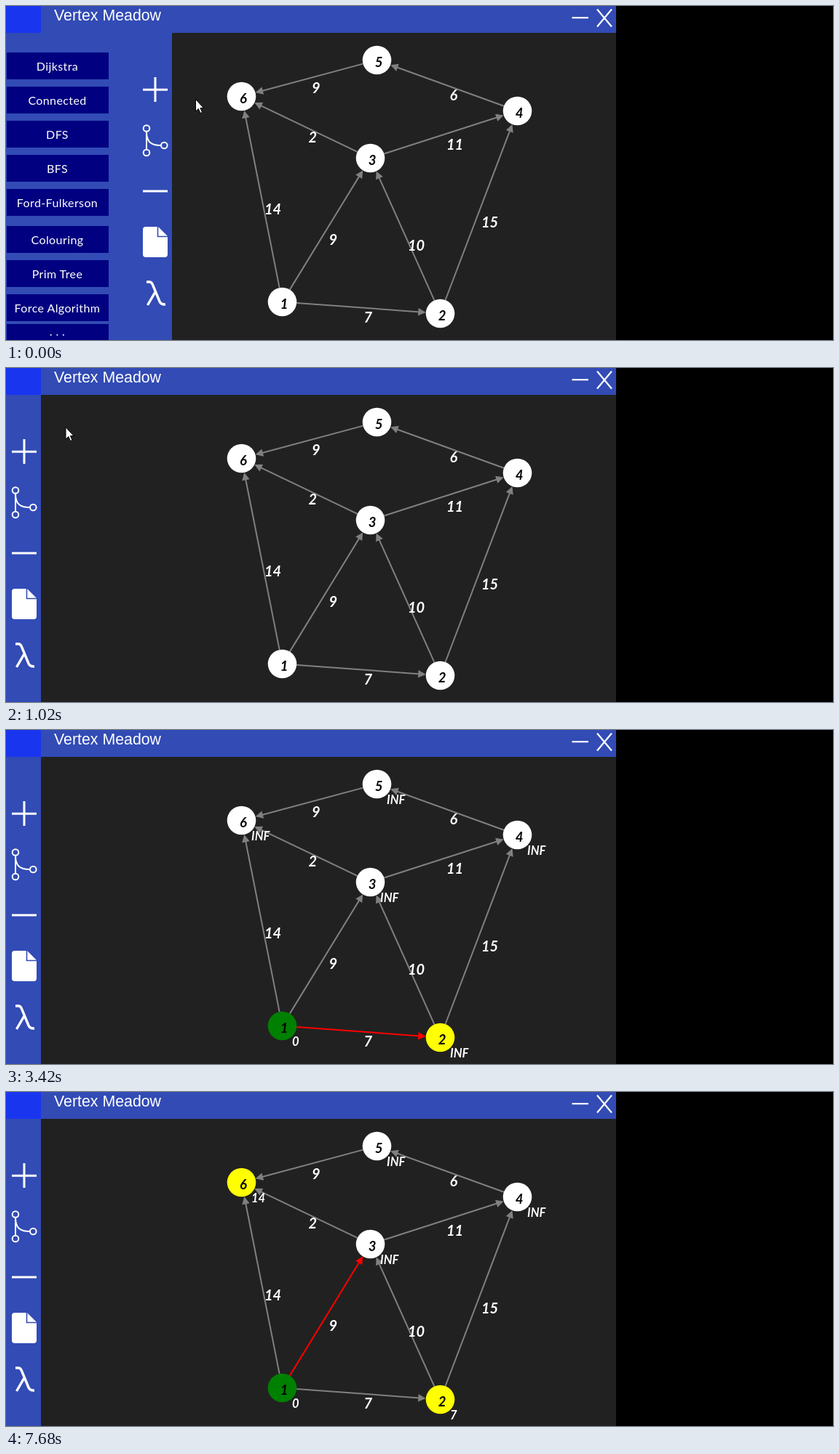
Recreate the animation shown at these times as an HTML page. Size 1136 px wide and 460 px high, loop 8 s.

```html
<!DOCTYPE html>
<html lang="en">
<head>
<meta charset="utf-8">
<title>Vertex Meadow</title>
<style>
html, body { margin: 0; width: 100%; height: 100%; overflow: hidden; background: #000; }
svg { display: block; width: 1136px; height: 460px; }
.stroke { fill: none; stroke: #fff; }
.title { font: 21.33px "Liberation Sans", Arial, sans-serif; fill: #fff; }
.menu { font: 16px Lato, sans-serif; letter-spacing: .4px; fill: #fff; text-anchor: middle; }
.num { font: italic 700 20px Lato, sans-serif; fill: #fff; }
.id { font-size: 18.5px; fill: #000; text-anchor: middle; }
.dist { font-size: 16.5px; }
.head { font: 700 15.6px "Liberation Sans", Arial, sans-serif; fill: #fff; }
.field { font: 18px "Open Sans", sans-serif; fill: #111; text-anchor: middle; }
</style>
</head>
<body>
<svg id="stage" viewBox="0 0 1136 460">
  <rect width="838" height="460" fill="#212121"/>
  <g id="graph"></g>

  <g id="panel">
    <rect y="37" width="228" height="423" fill="#324bb5"/>
    <g id="buttons"></g>
  </g>
  <g id="tools">
    <rect x="180" y="37" width="48" height="423" fill="#324bb5"/>
    <path class="stroke" stroke-width="3" d="M188 115.2H222M205 98V132M188 255H222"/>
    <g class="stroke" stroke-width="2">
      <circle cx="193" cy="168.5" r="4.3"/>
      <circle cx="193" cy="202" r="4.3"/>
      <circle cx="217.3" cy="192" r="4.3"/>
      <path d="M193 173V197.500M193 173C193 187 199 192 213 192"/>
    </g>
    <path fill="#fff" d="M192 304H209L222 317V342Q222 346 218 346H192Q188 346 188 342V308Q188 304 192 304Z"/>
    <path fill="none" stroke="#324bb5" stroke-width="1.6" d="M208.500 304V317.500H222"/>
    <path class="stroke" stroke-width="3.4" d="M193 380H197Q200 380 201.500 384L211 407Q213 411.500 219 411M205.500 393L194.500 412"/>
  </g>

  <rect width="838" height="37" fill="#324bb5"/>
  <rect width="48" height="37" fill="#1a35ee"/>
  <text class="title" x="66" y="20">Vertex Meadow</text>
  <path class="stroke" stroke-width="2.2" d="M777.500 16.200H800M812 4.500L832 28.500M832 4.500L812 28.500"/>

  <g id="dialog">
    <rect x="391" y="228" width="334" height="130" fill="#eee"/>
    <rect x="391" y="228" width="334" height="30" fill="#324bb5"/>
    <text class="head" x="394" y="243">Start vertex</text>
    <rect x="482.500" y="279.500" width="143" height="46" fill="#eee" stroke="#555"/>
    <path fill="#324bb5" d="M427 279h56v47h-56zM625 279h56v47h-56z"/>
    <path class="stroke" stroke-width="3" d="M436 302.500H474M635 302.500H673M654 286V319"/>
    <text class="field" x="553.500" y="297">1</text>
    <rect id="caret" x="558" y="281" width="1" height="20" fill="#000"/>
  </g>

  <circle id="halo" cx="81" cy="81" r="12" fill="#dede50" fill-opacity=".55"/>
  <path id="cursor" fill="#fff" stroke="#000" d="M.5 .5V17L4.300 13.400L7 19.500L9.500 18.400L6.900 12.500H11.500Z"/>
</svg>
<script>
const LOOP = 8000, TICK = 70;
const $ = id => document.getElementById(id);

function add(parent, tag, attrs, text) {
  const el = document.createElementNS("http://www.w3.org/2000/svg", tag);
  for (const key in attrs) el.setAttribute(key, attrs[key]);
  if (text !== undefined) el.textContent = text;
  parent.appendChild(el);
  return el;
}
const show = (el, on) => el.setAttribute("visibility", on ? "visible" : "hidden");
const place = (el, x, y) => el.setAttribute("transform", `translate(${x} ${y})`);

// Vertex centres, then edges as [from, to, weight]
const R = 19.8;
const points = {
  1: [379.5, 407.5], 2: [596.5, 423.5], 3: [500.5, 209.5],
  4: [702.5, 144.5], 5: [509.5, 74.5], 6: [323.5, 124.5]
};
const links = [
  [5, 6, 9], [4, 5, 6], [3, 6, 2], [3, 4, 11], [1, 6, 14],
  [1, 3, 9], [2, 3, 10], [2, 4, 15], [1, 2, 7]
];

const edges = {}, nodes = {}, dists = {};
const graph = $("graph");

for (const [from, to] of links) {
  const [x1, y1] = points[from], [x2, y2] = points[to];
  const len = Math.hypot(x2 - x1, y2 - y1);
  const angle = Math.atan2(y2 - y1, x2 - x1) * 180 / Math.PI;
  const g = add(graph, "g", { transform: `translate(${x1} ${y1}) rotate(${angle})` });
  add(g, "path", { d: `M${R} 0H${len - 28}`, "stroke-width": 2 });
  add(g, "path", { d: `M${len - R} 0l-10.500 -5.300v10.600z`, stroke: "none" });
  edges[`${from}-${to}`] = g;
}
for (const id in points) {
  const [x, y] = points[id];
  nodes[id] = add(graph, "circle", { cx: x, cy: y, r: R });
  add(graph, "text", { class: "num id", x: x + 2.5, y: y + 9.5 }, id);
}
for (const [from, to, weight] of links) {
  const [x1, y1] = points[from], [x2, y2] = points[to];
  add(graph, "text", { class: "num", x: (x1 + x2) / 2 + 3.5, y: (y1 + y2) / 2 + 20.5 }, weight);
}
for (const id in points) {
  const [x, y] = points[id];
  dists[id] = add(graph, "text", { class: "num dist", x: x + 13.5, y: y + 27.3 });
}

const names = ["Dijkstra", "Connected", "DFS", "BFS", "Ford-Fulkerson",
  "Colouring", "Prim Tree", "Force Algorithm", ". . ."];
const buttons = names.map((name, i) => {
  const y = i === 8 ? 438 : 64 + 47 * i + (i > 4 ? 4 : 0);
  const box = add($("buttons"), "rect", {
    x: 2, y: y + 1, width: 138, height: 35, stroke: "#000080", "stroke-width": 2
  });
  add($("buttons"), "text", { class: "menu", x: 70.5, y: y + (i === 8 ? 16 : 24.5) }, name);
  return box;
});

// Algorithm steps: [time, kind, key, value]
const steps = [
  [2150, "node", 1, "#008000"], [2150, "dist", 1, "0"],
  [3090, "edge", "1-2"], [3420, "node", 2, "#ffff00"],
  [4420, "dist", 2, "0+7"], [5410, "dist", 2, "7"],
  [5410, "edge", "1-6"], [5680, "node", 6, "#ffff00"],
  [6690, "dist", 6, "0+14"], [7680, "dist", 6, "14"],
  [7680, "edge", "1-3"]
];

function cursorAt(t) {
  if (t >= 2760) return [41, 102];
  const k = t < 390 ? 0 : Math.min(1, (Math.floor((t - 390) / TICK) + 1) / 8);
  const e = k * k * (3 - 2 * k);
  return [260 - 178.5 * e, 128 - 47 * e];
}

function draw(t) {
  const state = { node: {}, dist: {}, edge: null };
  for (const [time, kind, key, value] of steps) {
    if (t < time) break;
    if (kind === "edge") state.edge = key;
    else state[kind][key] = value;
  }
  for (const id in points) {
    nodes[id].setAttribute("fill", state.node[id] || "#fff");
    dists[id].textContent = t < 2150 ? "" : state.dist[id] || "INF";
  }
  for (const key in edges) {
    const color = key === state.edge ? "#ff0000" : "#808080";
    edges[key].setAttribute("fill", color);
    edges[key].setAttribute("stroke", color);
  }

  const open = t < 1020;
  show($("panel"), open);
  place($("tools"), open ? 0 : -180, 0);
  show($("dialog"), t >= 1090 && t < 2150);
  show($("caret"), t >= 1680 && t < 2150);

  const [x, y] = cursorAt(t);
  place($("cursor"), x, y);
  show($("cursor"), t < 2830);
  show($("halo"), t >= 950 && t < 1020);
  buttons.forEach((box, i) => {
    const top = +box.getAttribute("y") - 1;
    const hover = x < 141 && y >= top && y < top + 37;
    box.setAttribute("fill", hover ? "#3c38e2" : "#000080");
  });
}

const start = performance.now();
function tick() {
  draw((performance.now() - start) % LOOP);
  requestAnimationFrame(tick);
}
tick();
</script>
</body>
</html>
```
